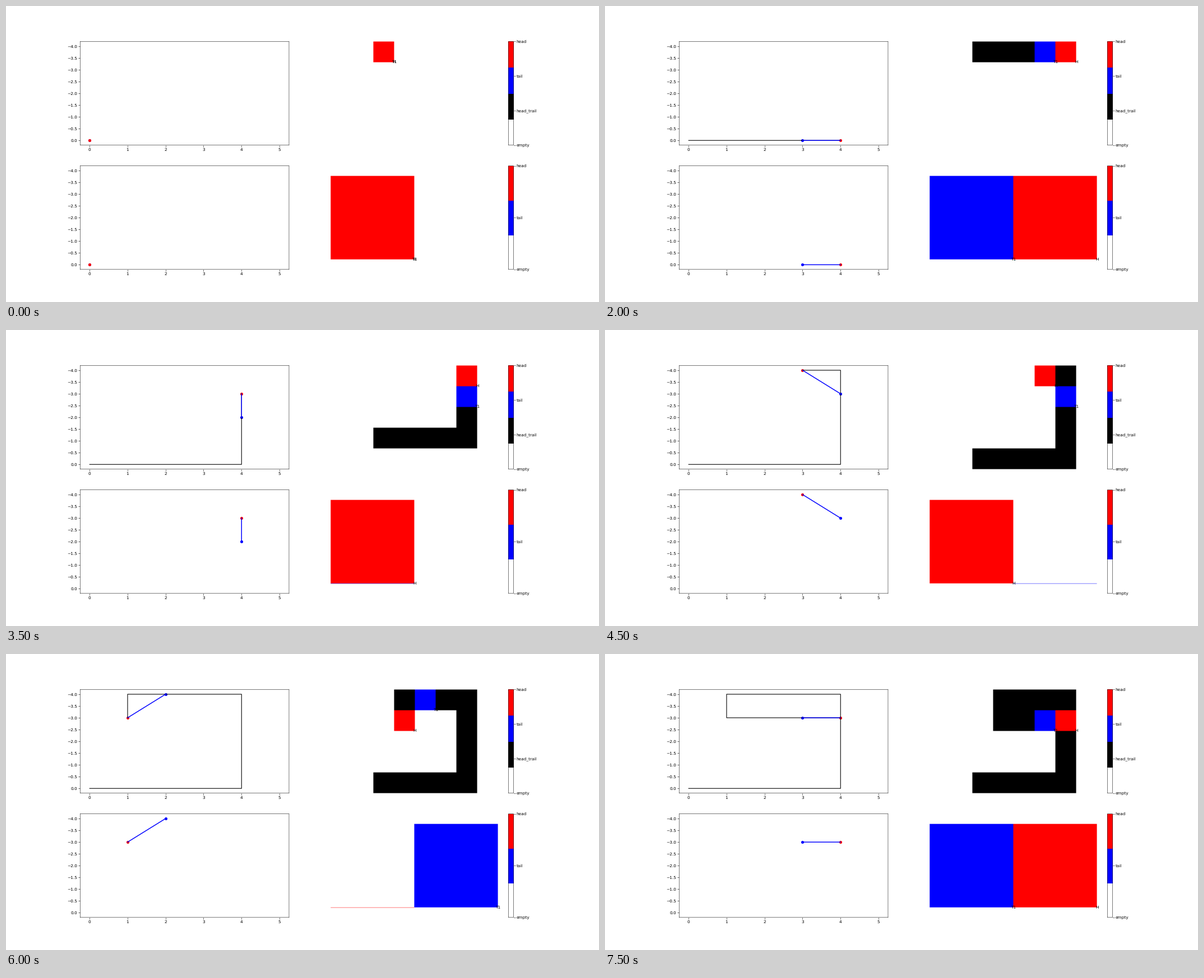
A matplotlib script that plays this animation: 1058x529 px, repeating every 8000 ms.

```python
import numpy as np
import matplotlib.pyplot as plt
from matplotlib.animation import FuncAnimation
from matplotlib.cm import ScalarMappable
from matplotlib.colors import ListedColormap, Normalize, to_rgb

STEPS = {"R": (1, 0), "L": (-1, 0), "U": (0, -1), "D": (0, 1)}
MOVES = "RRRR" "UUUU" "LLL" "D" "RRR"
INTERVAL = 500
WIDTH, HEIGHT = 1058, 529


def simulate():
    head, tail = np.array([0, 0]), np.array([0, 0])
    heads, tails = [head], [tail]
    for move in MOVES:
        head = head + STEPS[move]
        gap = head - tail
        if abs(gap).max() > 1:
            tail = tail + np.sign(gap)
        heads.append(head)
        tails.append(tail)
    return np.array(heads), np.array(tails)


def coverage(edges):
    """First pixel, and the share of each pixel covered by each interval."""
    start = int(np.floor(edges[0]))
    pixels = np.arange(start, int(np.ceil(edges[-1])))[:, None]
    overlap = np.minimum(pixels + 1, edges[1:]) - np.maximum(pixels, edges[:-1])
    return start, np.clip(overlap, 0, 1)


HEADS, TAILS = simulate()

plt.rcParams.update({"font.family": "DejaVu Sans", "text.hinting": "none",
                     "path.snap": False, "axes.linewidth": 0.72})
fig, axes = plt.subplots(2, 2, figsize=(20, 10), dpi=WIDTH / 20)
fig.set_facecolor("white")
UNIT = fig.dpi / 100  # cell edges fall on multiples of 1/100 inch


class RopePlot:
    """Rope as a line with dots, optionally with the path of the head."""

    def __init__(self, ax, show_trail):
        ax.set(xlim=(-0.25, 5.25), ylim=(0.2, -4.2),
               xticks=range(6), yticks=np.arange(-4, 0.1, 0.5))
        self.trail, = ax.plot([], [], color="black", lw=1.5, visible=show_trail)
        self.rope, = ax.plot([], [], color="blue", lw=2)
        self.tail_dot = ax.scatter([0], [0], color="blue")
        self.head_dot = ax.scatter([0], [0], color="red")

    def update(self, i):
        head, tail = HEADS[i], TAILS[i]
        self.trail.set_data(HEADS[:i + 1, 0], HEADS[:i + 1, 1])
        self.rope.set_data([tail[0], head[0]], [tail[1], head[1]])
        self.tail_dot.set_offsets([tail])
        self.head_dot.set_offsets([head])


class GridPlot:
    """Cells cropped to the visited area, inside a fixed window."""

    def __init__(self, ax, shape, colors, names, show_trail):
        self.shape, self.show_trail = shape, show_trail
        self.top = len(colors) - 1
        self.ink = 1 - np.array([to_rgb(c) for c in colors])
        rows, cols = shape
        ax.set(xlim=(-0.5, cols - 0.5), ylim=(rows - 0.5, -0.5), aspect="equal")
        ax.axis("off")

        scale = ScalarMappable(Normalize(0, self.top), ListedColormap(colors))
        bar = fig.colorbar(scale, ax=ax, ticks=range(self.top + 1))
        bar.ax.set_yticklabels(names)
        bar.solids.set(antialiased=True, linewidth=0)

        ax.apply_aspect()
        to_pixels = ax.transData.transform
        xs = to_pixels([(c - 0.5, 0) for c in range(cols + 1)])[:, 0]
        ys = HEIGHT - to_pixels([(0, r - 0.5) for r in range(rows + 1)])[:, 1]
        xs, ys = (np.round(edges / UNIT) * UNIT for edges in (xs, ys))
        # The row below the window shows as a hairline.
        ys = np.append(ys, ys[-1] + UNIT)
        left, self.x_share = coverage(xs)
        upper, self.y_share = coverage(ys)
        size = len(self.y_share), len(self.x_share)
        self.image = fig.figimage(np.ones((*size, 3)), left,
                                  HEIGHT - upper - size[0],
                                  origin="upper", zorder=-1)
        self.labels = [ax.text(0, 0, name, ha="center", va="center")
                       for name in ("T1", "H")]

    def update(self, i):
        ends = np.array([TAILS[i], HEADS[i]])
        cells = np.vstack([HEADS[:i + 1], ends]) if self.show_trail else ends
        cells = cells - cells.min(axis=0)
        rows, cols = self.shape
        values = [1] * (len(cells) - 2) + [self.top - 1, self.top]

        grid = np.zeros((rows + 1, cols), dtype=int)
        for (x, y), value in zip(cells, values):
            grid[y, x] = value
        ink = np.einsum("ir,rck,jc->ijk", self.y_share, self.ink[grid],
                        self.x_share)
        self.image.set_data(np.clip(1 - ink, 0, 1))
        for label, (x, y) in zip(self.labels, cells[-2:]):
            label.set_position((x + 0.5, y + 0.5))
            label.set_visible(bool(y < rows))


plots = [
    RopePlot(axes[0, 0], True),
    RopePlot(axes[1, 0], False),
    GridPlot(axes[0, 1], (5, 6), ["white", "black", "blue", "red"],
             ["empty", "head_trail", "tail", "head"], True),
    GridPlot(axes[1, 1], (1, 2), ["white", "blue", "red"],
             ["empty", "tail", "head"], False),
]


def update(i):
    for plot in plots:
        plot.update(i)
    return []


anim = FuncAnimation(fig, update, frames=len(HEADS), interval=INTERVAL,
                     init_func=lambda: update(0), repeat=True, repeat_delay=0)
plt.show()
```
